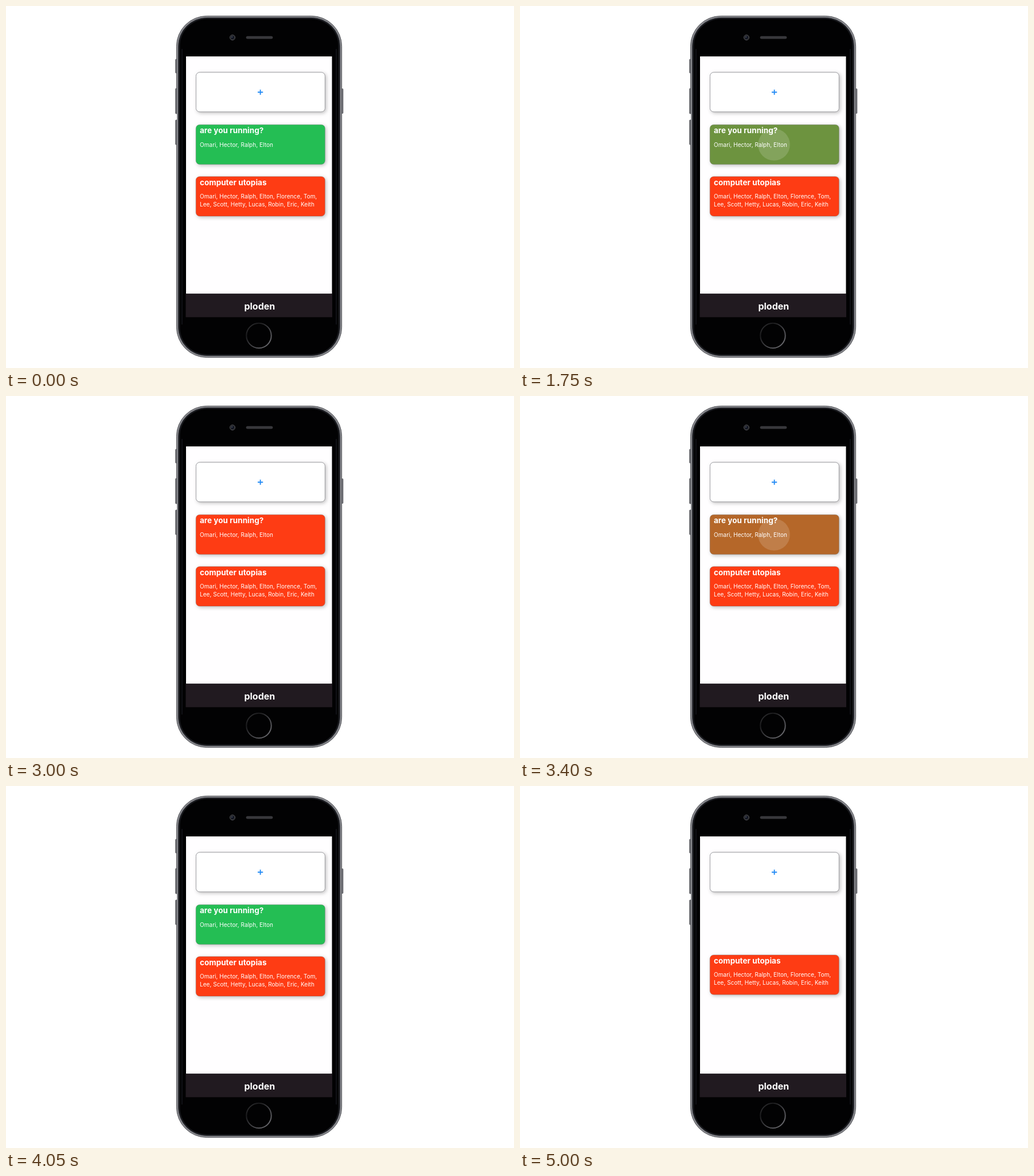
Write an HTML page that moves like this. It is 886 by 632 pixels and loops after 5.05 s.

```html
<!DOCTYPE html>
<html lang="en">
<head>
<meta charset="utf-8">
<title>Phone card list</title>
<style>
  html, body { margin: 0; width: 100%; height: 100%; overflow: hidden; background: #fff; }
  svg { display: block; width: 100vw; height: 100vh; }
  text { font-family: Inter, "Open Sans", sans-serif; fill: #fff; }
  .title { font-size: 13.5px; font-weight: 700; letter-spacing: .03px; }
  .people { font-size: 10px; letter-spacing: .04px; }
  .brand { font-size: 16px; font-weight: 700; text-anchor: middle; }
  .card { filter: drop-shadow(2px 2.5px 3px rgba(0, 0, 0, .25)); }
  .edge { stroke: rgba(110, 110, 110, .6); stroke-width: .6; }
</style>
</head>
<body>
<svg viewBox="0 0 886 632">
  <defs>
    <clipPath id="screen"><rect x="314" y="88" width="254.5" height="414.5"/></clipPath>
    <linearGradient id="ring" x1="0" x2="1" y1="0" y2="1">
      <stop offset="0" stop-color="#3a3a3d"/>
      <stop offset=".25" stop-color="#1b1b1d"/>
      <stop offset=".6" stop-color="#47474b"/>
      <stop offset="1" stop-color="#77777c"/>
    </linearGradient>
    <filter id="blur" x="-10%" y="-20%" width="120%" height="140%">
      <feGaussianBlur stdDeviation="1.7 0"/>
    </filter>
  </defs>

  <g fill="#77787d" stroke="#4b4c51" stroke-width=".6">
    <rect x="295.5" y="93" width="5" height="24" rx="1"/>
    <rect x="295.5" y="144" width="5" height="44" rx="1"/>
    <rect x="295.5" y="199" width="5" height="43" rx="1"/>
    <rect x="583" y="144.5" width="5" height="43" rx="1"/>
  </g>
  <rect x="297.4" y="17.4" width="288.2" height="596.2" rx="53" fill="#88898e" stroke="#4c4d52" stroke-width=".9"/>
  <rect x="300.6" y="20.4" width="281.8" height="590.2" rx="50" fill="#17181c" stroke="#303137" stroke-width=".8"/>
  <rect x="303.5" y="22.8" width="276" height="585.4" rx="47" fill="#020203"/>
  <path d="M307 75V556M576 75V556" stroke="#101116" stroke-width="2"/>
  <rect x="296" y="188.5" width="2" height="10" fill="#fff"/>

  <circle cx="395" cy="55" r="4.6" fill="#25262a" stroke="#4b4c51"/>
  <circle cx="395" cy="55" r="2.3" fill="#0b1020"/>
  <circle cx="394.2" cy="54.2" r=".9" fill="#6d7180"/>
  <rect x="419" y="53" width="46" height="4" rx="2" fill="#36363a" stroke="#48484c" stroke-width=".6"/>
  <circle cx="441" cy="575.5" r="21.7" fill="#020203" stroke="url(#ring)" stroke-width="2"/>

  <rect x="314" y="88" width="254.5" height="414.5" fill="#fffeff"/>
  <rect x="313.5" y="502.3" width="255.5" height="41" fill="#211a20"/>
  <text class="brand" x="442.3" y="530.3">ploden</text>

  <g clip-path="url(#screen)">
    <rect class="card" x="331.4" y="115.8" width="225" height="69" rx="6.5" fill="#fff" stroke="#858589" stroke-width=".8"/>
    <path d="M439 150.5h9.2M443.6 145.9v9.2" stroke="#2189f4" stroke-width="1.8"/>

    <g id="first">
      <g class="card"><rect id="face" class="edge" x="331.2" y="207.2" width="225.2" height="69.2" rx="6.5"/></g>
      <text class="title" x="338" y="222">are you running?</text>
      <text class="people" x="338" y="245.6">Omari, Hector, Ralph, Elton</text>
    </g>

    <g id="second">
      <g class="card"><rect class="edge" x="331.2" y="297.7" width="225.2" height="69.2" rx="6.5" fill="#fe3c14"/></g>
      <text class="title" x="338" y="312.7">computer utopias</text>
      <text class="people" x="338" y="336.2">Omari, Hector, Ralph, Elton, Florence, Tom,</text>
      <text class="people" x="338" y="350.2">Lee, Scott, Hetty, Lucas, Robin, Eric, Keith</text>
    </g>

    <circle id="touch" cy="242" fill="#fff"/>
  </g>
</svg>
<script>
const LOOP = 5050, STEP = 50;
const GREEN = [36, 190, 84], RED = [254, 60, 20];
const TOUCHES = [
  { down: 1350, up: 1650, x: 443 },
  { down: 3000, up: 3300, x: 443 },
  { down: 4250, up: 4600, x: 407 }
];
const el = id => document.getElementById(id);
const first = el('first'), second = el('second'), face = el('face'), touch = el('touch');
const ramp = (t, from, to) => Math.min(1, Math.max(0, (t - from) / (to - from)));

function drawTouch(t, shift) {
  const p = TOUCHES.find(p => t >= p.down && t < p.up + 150);
  if (!p) {
    touch.setAttribute('opacity', 0);
    return;
  }
  const fade = ramp(t, p.up, p.up + 150);
  touch.setAttribute('cx', p.x + shift);
  touch.setAttribute('r', 24.5 + 5 * fade);
  touch.setAttribute('opacity', .45 * ramp(t, p.down, p.down + 100) * (1 - fade));
}

function draw(t) {
  // Share of red: on after the first tap, off after the second
  const red = ramp(t, 1600, 2050) - ramp(t, 3250, 3700);
  const mix = GREEN.map((g, i) => Math.round(g + (RED[i] - g) * red));
  face.setAttribute('fill', `rgb(${mix})`);

  const shift = 82 * Math.max(0, (t - 4400) / 150) ** 1.5;
  first.setAttribute('transform', `translate(${shift} 0)`);
  first.setAttribute('visibility', shift > 250 ? 'hidden' : 'visible');
  if (shift > 0) first.setAttribute('filter', 'url(#blur)');
  else first.removeAttribute('filter');

  const rise = 2.7 * Math.max(0, (t - 4900) / 100) ** 2;
  second.setAttribute('transform', `translate(0 ${-rise})`);
  drawTouch(t, shift);
}

const start = performance.now();
function tick() {
  const t = (performance.now() - start) % LOOP;
  draw(Math.floor(t / STEP) * STEP);
  requestAnimationFrame(tick);
}
draw(0);
requestAnimationFrame(tick);
</script>
</body>
</html>
```
